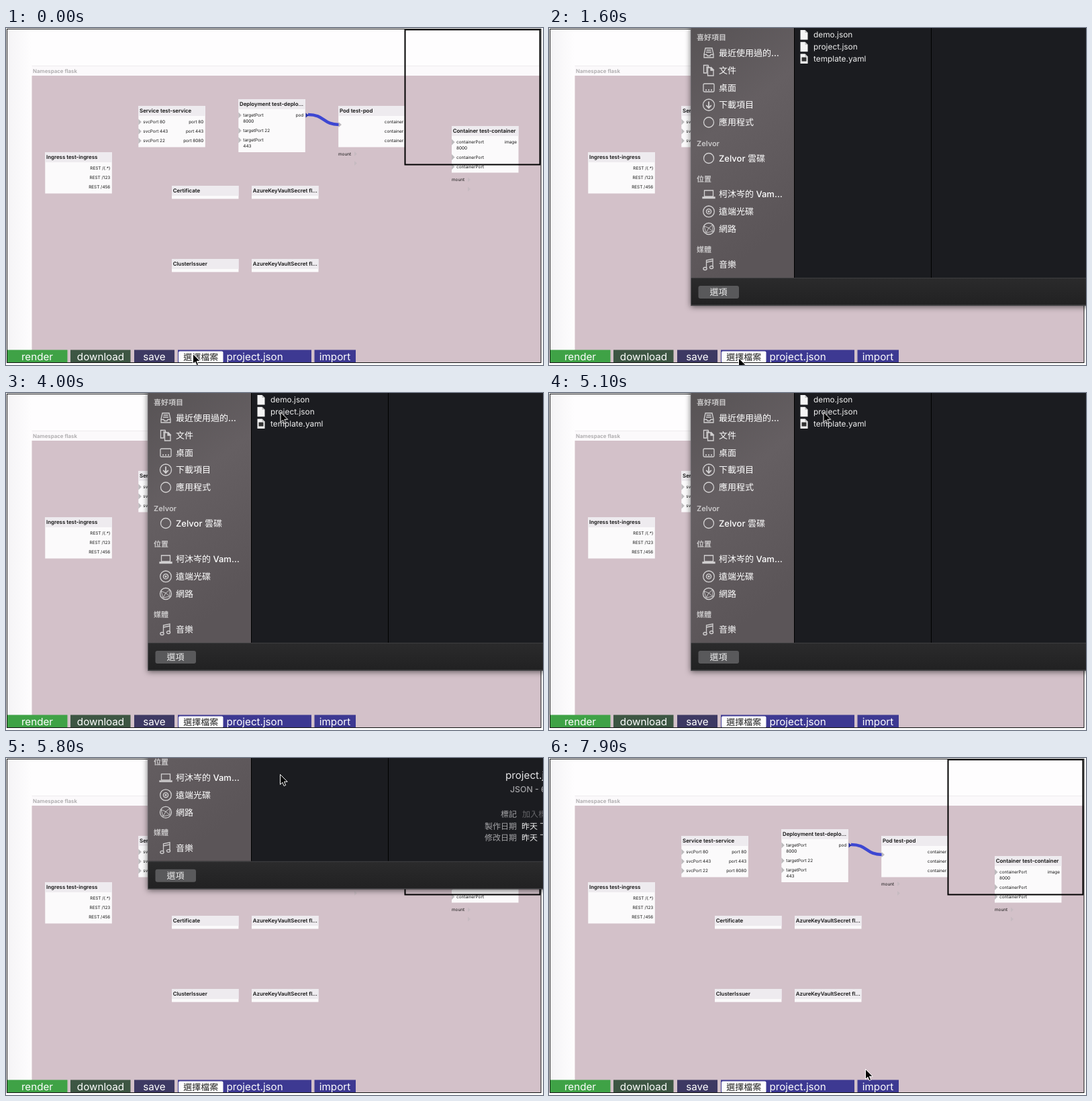
These frames come from a looping animation (800x502 px, 8000 ms). An HTML page:

```html
<!DOCTYPE html>
<html lang="zh-Hant">
<head>
<meta charset="utf-8">
<title>Project import</title>
<style>
html, body { margin: 0; width: 100%; height: 100%; overflow: hidden; background: #fff; }
svg { display: block; width: 800px; height: 502px; }
text { font-family: Inter, "Noto Sans CJK TC", "Noto Sans CJK", sans-serif; text-rendering: geometricPrecision; white-space: pre; }
.title { font-size: 7.9px; font-weight: 600; fill: #111; }
.port { font-size: 6.4px; fill: #151515; }
.end { text-anchor: end; }
.mid { text-anchor: middle; }
.btn { font-size: 15.2px; fill: #fff; }
.info { font-size: 11.85px; fill: #1c2be0; }
.row { font-size: 13px; font-weight: 500; fill: currentColor; }
.head { font-size: 11px; font-weight: 600; fill: currentColor; opacity: .66; }
.file { font-size: 11.85px; fill: #eee; }
.meta { font-size: 12px; font-weight: 500; fill: #a3a3a6; }
.icon { opacity: .72; fill: none; stroke: currentColor; stroke-width: 1.3; }
.icon .f { fill: currentColor; stroke: none; }
.icon .d { stroke: #4c484a; }

.cursor, .sheet, .side, .ready, .load, .picked, .hover { animation: 8s linear infinite; }
.cursor { animation-name: cursor; }
.sheet { animation-name: sheet; }
.side, .ready, .load, .picked, .hover { animation-timing-function: step-end; }
.side { animation-name: side; }
.ready { animation-name: ready; }
.load { animation-name: load; }
.picked { animation-name: picked; }
.hover { animation-name: hover; }

@keyframes cursor {
  0%, 5% { transform: translate(278px, 485px); }
  12.5%, 25% { transform: translate(282px, 491px); animation-timing-function: ease-in; }
  30% { transform: translate(314px, 400px); animation-timing-function: ease-out; }
  41.25%, 66.25% { transform: translate(408.5px, 28px); }
  70%, 80% { transform: translate(408px, 24px); animation-timing-function: ease-in; }
  86.25% { transform: translate(410px, 279px); }
  91.25% { transform: translate(440px, 398px); animation-timing-function: ease-out; }
  96.25% { transform: translate(472px, 471px); }
  98.75%, 100% { transform: translate(471px, 463px); }
}
@keyframes sheet {
  0%, 13.75% { transform: translateY(-430px); animation-timing-function: ease-in-out; }
  18.75%, 69% { transform: none; }
  70% { transform: translateY(-2.6px); animation-timing-function: ease-in-out; }
  75%, 100% { transform: translateY(-430px); }
}
@keyframes side { 0% { color: #a8a7a9; } 18.75%, 100% { color: #fff; } }
@keyframes ready { 0% { visibility: hidden; } 18.75%, 100% { visibility: visible; } }
@keyframes load { 0% { visibility: visible; } 18.75%, 100% { visibility: hidden; } }
@keyframes picked { 0% { visibility: hidden; } 66.25%, 100% { visibility: visible; } }
@keyframes hover { 0% { visibility: hidden; } 85% { visibility: visible; } 88.75%, 100% { visibility: hidden; } }
</style>
</head>
<body>
<svg viewBox="0 0 800 502">
  <defs>
    <linearGradient id="margin"><stop stop-color="#f5f4f6"/><stop offset="1" stop-color="#fefdfe"/></linearGradient>
    <linearGradient id="glass" x2=".3" y2="1"><stop stop-color="#545052"/><stop offset=".5" stop-color="#655f62"/><stop offset="1" stop-color="#5b5558"/></linearGradient>
    <linearGradient id="foot" x2="0" y2="1"><stop stop-color="#2b2b2c"/><stop offset="1" stop-color="#212122"/></linearGradient>
    <linearGradient id="paper" x2="1" y2="0"><stop offset=".55" stop-color="#fff"/><stop offset="1" stop-color="#dcdcdc"/></linearGradient>
    <clipPath id="clip"><path d="M211 -20H365V371H211Z"/></clipPath>
    <g id="laptop"><path d="M-6.5 -5.5h13v9h-13z"/><path class="f" d="M-9 4.5H9V6H-9z"/></g>
    <g id="disc"><circle class="f" r="8.3"/><circle class="d" r="3.6"/><circle class="d" r="1"/></g>
    <g id="music"><path d="M-3.5 5.5V-6.5L6 -8.5V3.5M-3.5 -3.5L6 -5.5"/><ellipse class="f" cx="-5.5" cy="6" rx="2.6" ry="2"/><ellipse class="f" cx="4" cy="4" rx="2.6" ry="2"/></g>
    <g id="camera"><path class="f" d="M-9 -4.5H-4L-2.5 -7H3L4.5 -4.5H9V6.5H-9z"/><circle class="d" r="3.8" cy="1"/></g>
    <g id="recent"><path d="M-5 -7H5L7 2V7H-7V2zM-7 2.5H-3L-2 4.5H2L3 2.5H7M-3.5 -4H3.5M-4 -1H4"/></g>
    <g id="pages"><path class="f" d="M-7.5 -7.5H-1L0 -5H-3V4H-7.5z"/><path class="f" d="M-1.5 -4H3V0H7V8H-1.5zM4 -4L7 -1H4z"/></g>
    <g id="desktop"><rect x="-8" y="-6" width="16" height="12" rx="1.5"/><path d="M-5 3.4H-3M-1 3.4H1M3 3.4H5" stroke-width="1.8"/></g>
    <g id="down"><circle class="f" r="8.5"/><path class="d" d="M0 -5V4M-3.8 .6L0 4.6 3.8 .6" stroke-width="1.8"/></g>
    <g id="dot"><circle class="f" r="7.5"/></g>
    <g id="globe"><circle class="f" r="8.5"/><path class="d" d="M-7 -4L0 -1 6 -6M0 -1L-4 6M0 -1L6 4M-4 6L6 4M-7 -4L-4 6M6 -6L6 4" stroke-width=".9"/></g>
  </defs>

  <path fill="#fefdfe" d="M1 1H797V498H1z"/>
  <path fill="url(#margin)" d="M2 2H38V498H2z"/>
  <path fill="#fbf9fb" d="M38.5 56H796V71H38.5z"/>
  <path stroke="#eeebee" d="M38.5 56.5H796"/>
  <path fill="#d3c1c9" d="M38.5 71H797V498H38.5z"/>
  <text x="40" y="66.5" class="title" style="fill:#aaa8aa">Namespace flask</text>

  <g id="nodes"></g>
  <path d="M450 129C475 129 472 144 496 144" fill="none" stroke="#3d47d2" stroke-width="4.5"/>
  <path d="M446.500 126.500L451 130 446.500 133.500z" fill="#2531a8"/>
  <path d="M495.500 140L500 144 495.500 148z" fill="#bdbabd"/>
  <text x="495" y="189.700" class="port">mount</text>
  <text x="664" y="228.200" class="port">mount</text>
  <g fill="#c6bbc1">
    <path d="M519 184L523 187.500 519 191z"/><path d="M519 198L523 201.500 519 205z"/>
    <path d="M688 222.500L692 226 688 229.500z"/><path d="M688 236.500L692 240 688 243.500z"/>
  </g>

  <g class="hover"><rect x="366" y="235" width="99.500" height="19.500" fill="none" stroke="#55505a" stroke-width=".8"/><g id="info"></g></g>
  <rect x="594.500" y="2.500" width="201" height="201" fill="none" stroke="#000" stroke-width="2"/>

  <path fill="#3fa246" d="M2 479.500H91.500V498H2z"/>
  <path fill="#3d5643" d="M96 479.500H185.500V498H96z"/>
  <path fill="#3d3963" d="M191 479.500H251V498H191z"/>
  <path fill="#3d3992" d="M256 479.500H455V498H256zM459.500 479.500H521V498H459.500z"/>
  <rect x="257" y="481.500" width="66.500" height="17" rx="2" fill="#fdfdfd"/>
  <text x="290.200" y="495" class="mid" font-size="13" fill="#222">選擇檔案</text>
  <g class="btn">
    <text x="46.500" y="495" class="mid">render</text>
    <text x="141" y="495" class="mid">download</text>
    <text x="221" y="495" class="mid">save</text>
    <text x="328.500" y="495">project.json</text>
    <text x="490" y="495" class="mid">import</text>
  </g>
  <rect x="1.500" y="1.500" width="795.500" height="497" fill="none" stroke="#111"/>

  <g class="sheet">
    <rect x="211" y="-40" width="620" height="453.500" fill="#1b1c20" style="filter:drop-shadow(0 2px 4px rgba(0,0,0,.55))"/>
    <path fill="#373638" d="M211 -40H365V372H211z"/>
    <path class="ready" fill="url(#glass)" d="M211 -40H365V372H211z"/>
    <path stroke="#000" d="M365.500 -40V372M569.500 -40V372"/>
    <g class="side" clip-path="url(#clip)">
      <g id="common"></g>
      <g class="load"><g id="loading"></g><path class="f" fill="#8a898b" d="M230 369H246V373H230z"/></g>
      <g class="ready" id="loaded"></g>
    </g>
    <path fill="url(#foot)" d="M211 372H831V413.500H211z"/>
    <path stroke="#3e3e40" d="M211 372.500H831"/>
    <path stroke="#77757a" stroke-opacity=".6" d="M211.500 -40V413.500M211 413H831"/>
    <rect x="222.500" y="384" width="60.500" height="19" rx="3" fill="#59595b"/>
    <text x="252.500" y="398.400" class="mid" font-size="13" fill="#eee">選項</text>

    <g class="picked">
      <path fill="#0b4fd3" d="M366 19H569V36H366z"/>
      <path fill="url(#paper)" d="M721.500 22.500H776Q792 23 801 34V195H721.500z"/>
      <text x="744" y="249" font-size="15.200" fill="#e4e4e6">project.json</text>
      <text x="751" y="269" font-size="12.300" font-weight="500" fill="#a3a3a6">JSON - 6 KB</text>
      <g class="meta">
        <text x="761" y="306" class="end">標記</text>
        <text x="761" y="323.800" class="end">製作日期</text>
        <text x="761" y="341.600" class="end">修改日期</text>
        <text x="769" y="306" style="fill:#66666a;font-weight:400">加入標記</text>
        <text x="768" y="323.800" style="fill:#eee">昨天 下午</text>
        <text x="768" y="341.600" style="fill:#eee">昨天 下午</text>
      </g>
    </g>
    <g id="files"></g>
  </g>

  <g class="cursor"><path d="M.5 .5V15.500L3.900 12.300 6.200 17.600 8.700 16.500 6.400 11.300H11.200z" fill="#000" stroke="#fff" stroke-width="1"/></g>
</svg>
<script>
const put = (id, html) => { document.getElementById(id).innerHTML += html; };
const label = (x, y, cls, s) => `<text x="${x}" y="${y}" class="${cls}">${s}</text>`;

function node(x, y, h, title, left = [], right = []) {
  let out = `<rect x="${x}" y="${y}" width="99.5" height="${h}" fill="#fbfafb"/>
    <rect x="${x}" y="${y}" width="99.5" height="15" fill="#eeebef"/>` + label(x + 1.7, y + 9.9, "title", title);
  for (const [dy, s, more] of left) {
    const c = y + dy;
    out += `<path d="M${x} ${c - 4.5}L${x + 4.5} ${c} ${x} ${c + 4.5}z" fill="#bdbabd"/>` + label(x + 7, c + 2.2, "port", s);
    if (more) out += label(x + 7, c + 11, "port", more);
  }
  for (const [dy, s] of right) out += label(x + 97, y + dy + 2.2, "port end", s);
  put("nodes", out);
}
node(197.3, 116, 61.5, "Service test-service",
  [[24, "svcPort 80"], [38, "svcPort 443"], [52, "svcPort 22"]],
  [[24, "port 80"], [38, "port 443"], [52, "port 8080"]]);
node(346.3, 106, 79, "Deployment test-deplo…",
  [[24, "targetPort", "8000"], [47, "targetPort 22"], [61, "targetPort", "443"]], [[24, "pod"]]);
node(495.2, 116, 61.5, "Pod test-pod", [], [[24, "container"], [38, "container"], [52, "container"]]);
node(664, 146, 69.5, "Container test-container",
  [[24, "containerPort", "8000"], [46.5, "containerPort"], [60.5, "containerPort"]], [[24, "image"]]);
node(58.3, 185, 61.5, "Ingress test-ingress", [], [[24, "REST /(.*)"], [38, "REST /123"], [52, "REST /456"]]);
node(247, 235, 19.5, "Certificate");
node(366, 235, 19.5, "AzureKeyVaultSecret fl…");
node(247, 344, 19.5, "ClusterIssuer");
node(366, 344, 19.5, "AzureKeyVaultSecret fl…");

["Labels:", "Annotations:", "namespace: flask", "vaultName: flask-keyvault",
  "vaultObjectName: client-cert-abc", "vaultObjectType: certificate",
  "outputSecretName: flask-cli-cert", "outputSecretDataKey: ca.crt"]
  .forEach((s, i) => put("info", label(595.5, 17.2 + i * 16.86, "info", s)));

const head = (id, y, s) => put(id, label(220, y + 4, "head", s));
const row = (id, y, icon, s) => put(id,
  `<g class="icon" transform="translate(238 ${y})"><use href="#${icon}"/></g>` + label(253, y + 4.8, "row", s));
head("common", 14, "喜好項目");
row("common", 37, "recent", "最近使用過的…");
row("common", 63, "pages", "文件");
row("common", 89, "desktop", "桌面");
row("common", 114.5, "down", "下載項目");
row("common", 140.5, "dot", "應用程式");
head("common", 172, "Zelvor");
row("common", 194, "dot", "Zelvor 雲碟");
head("common", 224.5, "位置");
row("common", 247.5, "laptop", "柯沐岑的 Vam…");
row("common", 273.3, "disc", "遠端光碟");
head("loading", 304, "媒體");
row("loading", 327, "music", "音樂");
row("loading", 353, "camera", "照片");
row("loaded", 299, "globe", "網路");
head("loaded", 329.5, "媒體");
row("loaded", 352.5, "music", "音樂");

["demo.json", "project.json", "template.yaml"].forEach((s, i) => {
  const y = 10 + i * 17.8;
  put("files", `<path d="M374.5 ${y - 7}h7l4 4v10.500h-11z" fill="#f4f4f4"/><path d="M381.500 ${y - 7}v4h4z" fill="#bbb"/>`
    + (i == 2 ? `<path d="M376.500 ${y - 2}h7v6h-7z" fill="#333"/>` : "") + label(394, y + 4.1, "file", s));
});
</script>
</body>
</html>
```
